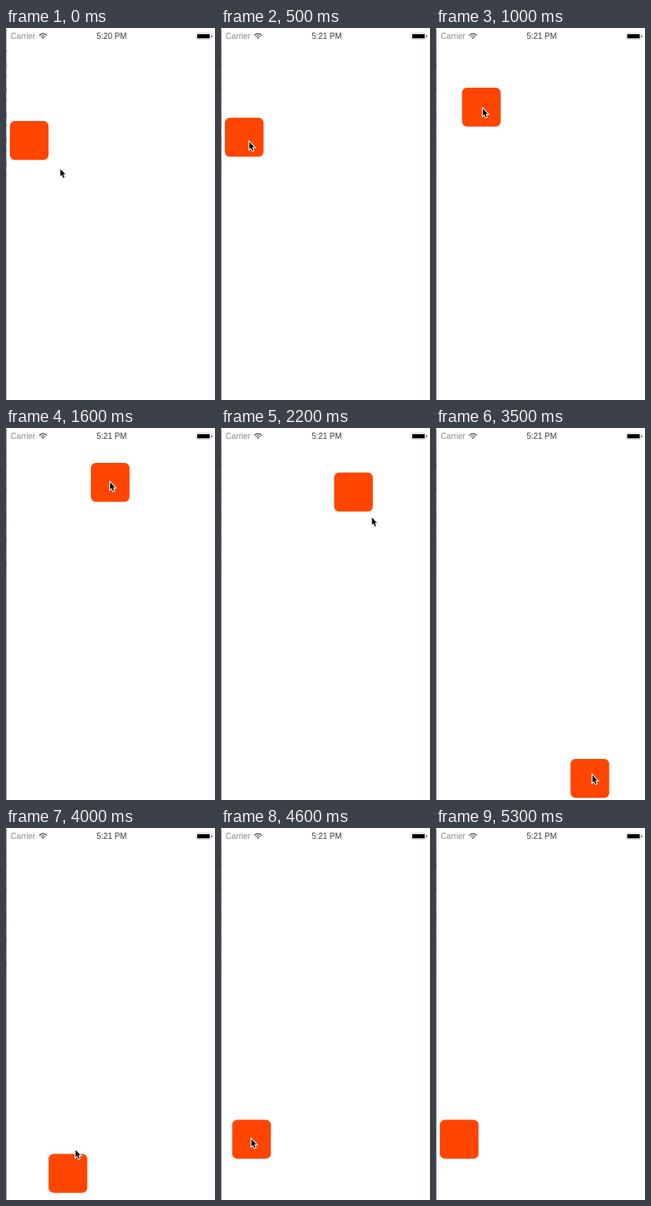
An HTML page for the animation above (7 s loop, 271 by 480 pixels).

```html
<!DOCTYPE html>
<html lang="en">
<head>
<meta charset="utf-8">
<title>Draggable square</title>
<style>
html, body { margin: 0; width: 100%; height: 100%; overflow: hidden; background: #fff; }
svg { display: block; width: 100%; height: 100%; }
text { font: 10.5px "Liberation Sans", Arial, sans-serif; }
</style>
</head>
<body>
<svg viewBox="0 0 271 480">
  <rect width="271" height="480" fill="#fff"/>
  <path id="edge" d="M.5 2V480"/>
  <path d="M.5 28V190" stroke="#8a8a8a" stroke-dasharray="3 14 6 9"/>
  <rect id="box" width="50.2" height="50.2" rx="6.5" fill="#ff4500"/>
  <text x="6" y="14.3" fill="#8a8a8a">Carrier</text>
  <g fill="none" stroke="#444" stroke-width="1.1">
    <path d="M43 9.5Q48 5.2 53 9.5M44.8 11.4Q48 8.7 51.2 11.4"/>
    <path d="M46.4 12.3L48 14L49.6 12.3Q48 11.3 46.4 12.3Z" fill="#444" stroke="none"/>
  </g>
  <text id="clock" x="117.4" y="14.3" fill="#3a3a3a"></text>
  <rect x="246.9" y="6.9" width="18.3" height="7.4" rx="1.2" fill="#fff" stroke="#aaa" stroke-width=".7"/>
  <rect x="248" y="7.9" width="16.1" height="5.4" rx=".5"/>
  <rect x="266" y="9.4" width="1.5" height="2.6" rx=".7" fill="#555"/>
  <g id="cursor">
    <path d="M1 2V12.5L7.6 9.6Z" opacity=".18"/>
    <path d="M0 0V9.2L2 7.4L3.8 11.4L5.3 10.7L3.6 6.8H6.5Z"
      stroke="#fff" stroke-width="2.2" paint-order="stroke"/>
  </g>
</svg>
<script>
const LOOP = 7000, HALF = 25;
// Stops: time, box x, box y, then how far the pointer leads the box centre
const stops = [
  [0, 5, 120, 40.5, 37], [600, 5, 115],
  [1000, 33.7, 77, 2, 2], [1200, 43.5, 6], [1400, 43.5, 6],
  [1600, 110, 45], [1800, 136.5, 6], [2000, 136.5, 6],
  [2200, 146.7, 57.6, 24, 33], [2400, 166, 314], [2800, 217, 351, 8.5, 17.5],
  [3500, 174.4, 427, 3.5, -4], [3900, 65, 391], [4000, 55.2, 420.5, 10, -30],
  [4200, 57, 427], [4600, 14.5, 376.5], [4800, 5, 376.5]
];
const get = id => document.getElementById(id);
const box = get("box"), cursor = get("cursor"), clock = get("clock"), edge = get("edge");

function pose(t) {
  const next = stops.findIndex(s => s[0] > t);
  const b = next < 0 ? stops[stops.length - 1] : stops[next];
  const a = next < 0 ? b : stops[next - 1];
  const k = a === b ? 0 : (t - a[0]) / (b[0] - a[0]);
  const mix = (p, q) => p + (q - p) * k;
  return [1, 2, 3, 4].map(n => mix(a[n] || 0, b[n] || 0));
}

// Ten ticks a second, with every sixth tick held
function tick(ms) {
  const t = Math.floor((ms % LOOP) / 100) * 100;
  return t % 600 === 100 ? t - 100 : t;
}

function place(el, x, y) {
  el.setAttribute("transform", `translate(${x} ${y})`);
}

function draw(ms) {
  const t = tick(ms);
  const [x, y, leadX, leadY] = pose(t);
  place(box, x, y);
  place(cursor, x + HALF + leadX, y + HALF + leadY);
  cursor.setAttribute("visibility", t < 4800 ? "visible" : "hidden");
  clock.textContent = t < 200 ? "5:20 PM" : "5:21 PM";
  edge.setAttribute("stroke", t < 200 ? "#bdbdbd" : "#a2a2a2");
}

const start = performance.now();
function loop() {
  draw(performance.now() - start);
  requestAnimationFrame(loop);
}
loop();
</script>
</body>
</html>
```
